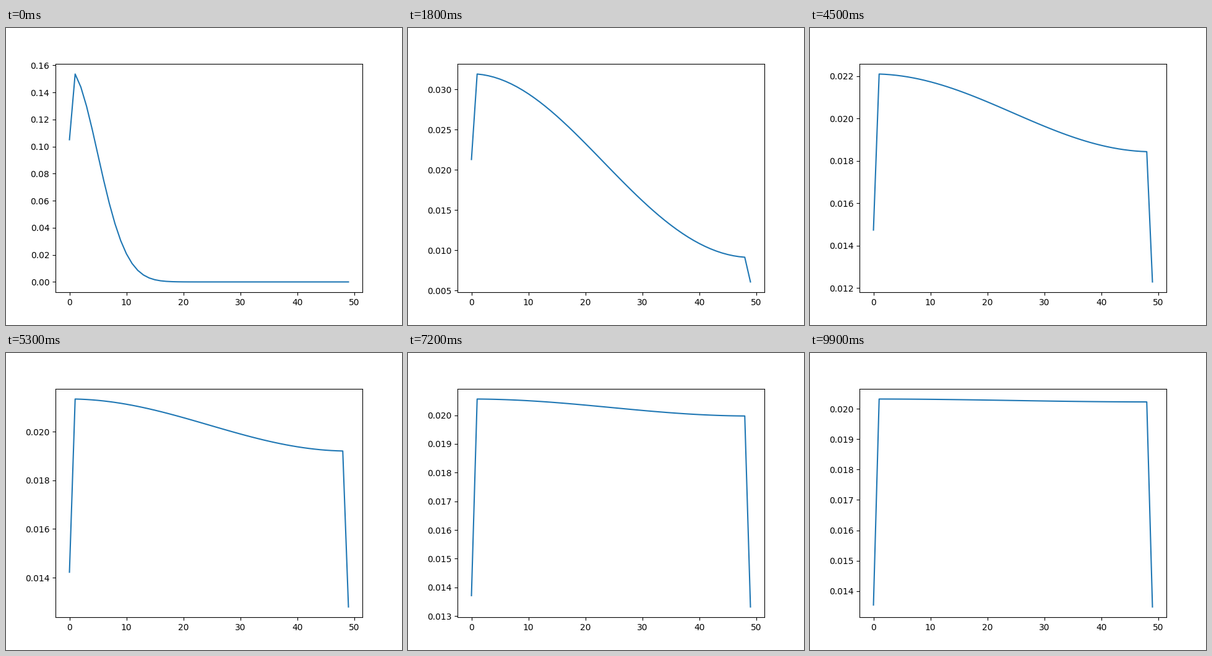
A matplotlib script that plays this animation: 640x480 px, repeating every 10 s.

```python
import numpy as np
import matplotlib.pyplot as plt
from matplotlib.animation import FuncAnimation

STATES = 50
FRAMES = 100
FIRST = 38      # steps already taken when the loop starts
PER_FRAME = 50  # steps between frames


def walk_matrix(n):
    """Random walk on a line: stay or move to a neighbour, all equally likely."""
    links = np.eye(n) + np.eye(n, k=1) + np.eye(n, k=-1)
    return links / links.sum(axis=1, keepdims=True)


def distributions():
    step = walk_matrix(STATES)
    jump = np.linalg.matrix_power(step, PER_FRAME)
    p = np.linalg.matrix_power(step, FIRST)[0]
    rows = []
    for _ in range(FRAMES):
        rows.append(p)
        p = p @ jump
    return rows


probs = distributions()

fig, ax = plt.subplots(figsize=(6.4, 4.8), dpi=100)
line, = ax.plot(range(STATES), probs[0])


def update(i):
    line.set_ydata(probs[i])
    ax.relim()
    ax.autoscale_view()
    return line,


anim = FuncAnimation(fig, update, frames=FRAMES, interval=100, repeat=True,
                     repeat_delay=0, blit=False)
plt.show()
```
